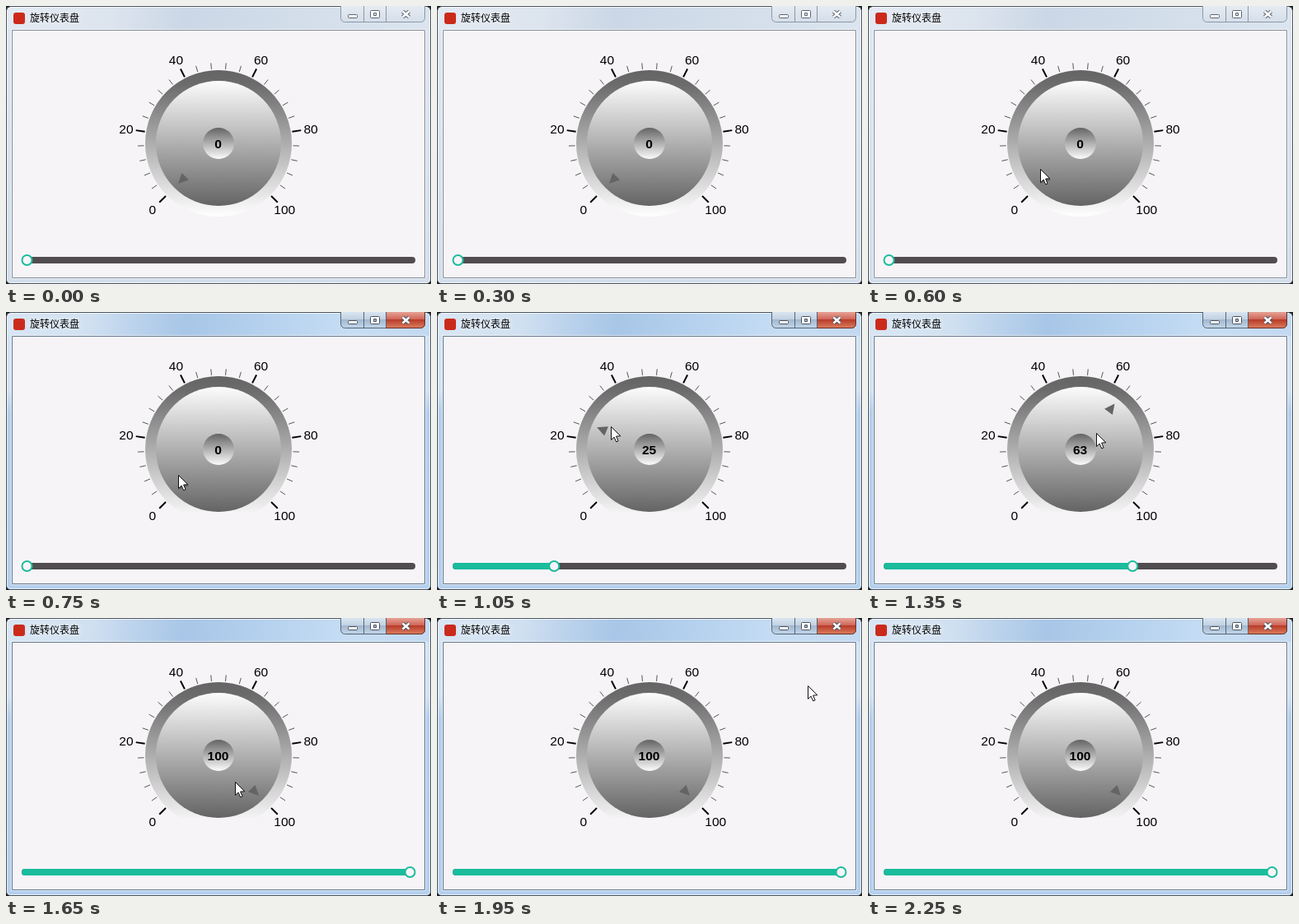
Write an HTML page with a canvas that moves like this. It is 516x338 px and loops after 2.55 s.

```html
<!DOCTYPE html>
<html lang="zh">
<head>
<meta charset="utf-8">
<title>旋转仪表盘</title>
<style>
  html, body { margin: 0; width: 100%; height: 100%; overflow: hidden; background: #222; }
  canvas { display: block; width: 516px; height: 338px; }
</style>
</head>
<body>
<canvas id="stage" width="516" height="338"></canvas>
<script>
const ctx = document.getElementById('stage').getContext('2d');
const LOOP = 2550, STEP = 150, ACTIVATE = 750;
const CX = 258, CY = 167;
const SANS = '"Liberation Sans", Arial, sans-serif';
const PAPER = '#f7f4f8', GREEN = '#1abc9c';

// Keyframes: [ms, value] and [ms, x, y]
const VALUES = [[750, 0], [900, 12], [1050, 25.1], [1350, 63.6], [1500, 84], [1650, 100]];
const POINTER = [[450, 250, 225], [600, 209, 198], [750, 209, 198], [900, 203, 168],
  [1050, 211, 139], [1200, 247, 125], [1350, 277, 147], [1500, 292, 172],
  [1650, 278, 199], [1800, 350, 150], [1950, 450, 82], [2100, 500, 50]];

function sample(keys, t) {
  if (t <= keys[0][0]) return keys[0].slice(1);
  for (let i = 1; i < keys.length; i++) {
    const a = keys[i - 1], b = keys[i];
    if (t <= b[0]) {
      const k = (t - a[0]) / (b[0] - a[0]);
      return a.slice(1).map((v, j) => v + (b[j + 1] - v) * k);
    }
  }
  return keys[keys.length - 1].slice(1);
}

function gradient(x0, y0, x1, y1, stops) {
  const g = ctx.createLinearGradient(x0, y0, x1, y1);
  stops.forEach(([at, color]) => g.addColorStop(at, color));
  return g;
}

function roundRect(x, y, w, h, r, fill, stroke) {
  ctx.beginPath();
  ctx.roundRect(x, y, w, h, r);
  if (fill) { ctx.fillStyle = fill; ctx.fill(); }
  if (stroke) { ctx.strokeStyle = stroke; ctx.lineWidth = 1; ctx.stroke(); }
}

function disc(x, y, r, fill) {
  ctx.beginPath();
  ctx.arc(x, y, r, 0, Math.PI * 2);
  ctx.fillStyle = fill;
  ctx.fill();
}

function polygon(points) {
  ctx.beginPath();
  points.forEach(([x, y]) => ctx.lineTo(x, y));
  ctx.closePath();
}

function text(str, x, y, font, align = 'center', color = '#000') {
  ctx.font = font;
  ctx.textAlign = align;
  ctx.fillStyle = color;
  ctx.fillText(str, x, y);
}

const angleOf = value => (135 + value * 2.7) * Math.PI / 180;
const polar = (a, r) => [CX + r * Math.cos(a), CY + r * Math.sin(a)];

function drawFrame(active) {
  ctx.fillStyle = '#1d1f22';
  ctx.fillRect(0, 0, 516, 338);
  const side = active
    ? gradient(0, 0, 0, 338, [[0, '#d5e3f3'], [0.28, '#d3e2f2'], [0.36, '#b4cfec'], [1, '#b4d0ee']])
    : gradient(0, 0, 0, 338, [[0, '#dfe7f1'], [1, '#d3deeb']]);
  roundRect(0.5, 0.5, 515, 337, [6, 6, 5, 5], side, '#4b535d');
  const bar = active
    ? [[0, '#d9e6f4'], [0.2, '#d0e0f1'], [0.3, '#bcd3ec'], [0.42, '#a8c6e7'], [0.6, '#b5d1ee'], [0.8, '#c6ddf4'], [1, '#c2d9f1']]
    : [[0, '#e3eaf3'], [0.25, '#dce4ee'], [0.42, '#cbd7e6'], [0.65, '#d2ddea'], [1, '#dce5ef']];
  ctx.fillStyle = gradient(0, 0, 516, 60, bar);
  ctx.fillRect(2, 2, 512, 27);
  roundRect(1.5, 1.5, 513, 335, [5, 5, 4, 4], null, 'rgba(255,255,255,.65)');

  roundRect(6.5, 28.5, 503, 303, 1, null, 'rgba(255,255,255,.6)');
  ctx.fillStyle = PAPER;
  ctx.fillRect(7, 29, 502, 302);
  roundRect(7.5, 29.5, 501, 301, 0, null, active ? '#65788d' : '#858e99');

  roundRect(9, 8, 14, 14, 3, '#cb2a1b');
  ctx.save();
  ctx.shadowColor = '#fff';
  ctx.shadowBlur = 9;
  text('旋转仪表盘', 29, 19, '12px "Noto Sans CJK SC", "Noto Sans CJK", sans-serif', 'left');
  ctx.restore();
  drawButtons(active);
}

function drawButtons(active) {
  const glass = active
    ? [[0, '#d9e5f1'], [0.45, '#c3d2e2'], [0.5, '#a3b8ce'], [1, '#c0d5e9']]
    : [[0, '#e5ebf2'], [1, '#d5dfea']];
  const red = [[0, '#e6a296'], [0.45, '#d0685a'], [0.5, '#b93c29'], [1, '#d97a5b']];
  const edge = active ? '#566575' : '#8c98a6';
  roundRect(406.5, -1.5, 102, 21, [0, 0, 5, 5], gradient(0, 0, 0, 19, glass), edge);
  if (active) roundRect(461.5, -1.5, 47, 21, [0, 0, 5, 0], gradient(0, 0, 0, 19, red), '#6b3028');
  ctx.fillStyle = edge;
  ctx.fillRect(434, 0, 1, 19);
  ctx.fillRect(461, 0, 1, 19);

  const ink = active ? '#4b5360' : '#5c6470';
  roundRect(415.5, 10.5, 11, 4, 1, '#fff', ink);
  roundRect(442.5, 5.5, 11, 9, 1, '#fff', ink);
  roundRect(446.5, 8.5, 3, 3, 0, active ? '#a9bdd2' : '#dbe3ec', ink);
  for (const [color, width] of [[ink, 4.6], ['#fff', 2.5]]) {
    ctx.strokeStyle = color;
    ctx.lineWidth = width;
    ctx.beginPath();
    ctx.moveTo(481.5, 6.5); ctx.lineTo(489.5, 13.5);
    ctx.moveTo(489.5, 6.5); ctx.lineTo(481.5, 13.5);
    ctx.stroke();
  }
}

function drawScale() {
  for (let v = 0; v <= 100; v += 4) {
    const a = angleOf(v), major = v % 20 === 0;
    ctx.beginPath();
    ctx.moveTo(...polar(a, 90.5));
    ctx.lineTo(...polar(a, major ? 101.5 : 98));
    ctx.lineWidth = major ? 2 : 1;
    ctx.strokeStyle = major ? '#000' : '#555';
    ctx.stroke();
    if (major) {
      const [x, y] = polar(a, 113.5);
      text(v, x, y + 5.5, '15.5px ' + SANS);
    }
  }
}

function drawDial(value, active) {
  ctx.save();
  ctx.beginPath();
  ctx.rect(160, 70, 200, active ? 173 : 190);
  ctx.clip();
  disc(CX, CY, 89, gradient(0, 78, 0, 256, [[0, '#646464'], [0.1, '#6c6c6c'], [1, '#fff']]));
  ctx.restore();
  disc(CX, CY, 76, gradient(0, 91, 0, 243, [[0, '#fcfcfc'], [1, '#646464']]));

  const a = angleOf(value);
  polygon([polar(a, 69.3), polar(a - 0.107, 57.2), polar(a + 0.107, 57.2)]);
  ctx.fillStyle = '#646464';
  ctx.fill();

  disc(CX, CY, 19, gradient(0, 148, 0, 186, [[0, '#646464'], [1, '#fcfcfc']]));
  text(Math.floor(value), 257.5, 173, 'bold 15.5px ' + SANS);
}

function drawSlider(value) {
  const x = 25.5 + value * 4.65;
  roundRect(19, 305, 478, 8, 4, '#504c50');
  if (value > 0) roundRect(19, 305, x - 19, 8, 4, GREEN);
  disc(x, 309, 7, GREEN);
  disc(x, 309, 5, PAPER);
}

function drawPointer(x, y) {
  ctx.save();
  ctx.translate(Math.round(x) + 0.5, Math.round(y) + 0.5);
  polygon([[0, 0], [0, 16], [3.6, 12.6], [6.2, 18.4], [8.6, 17.4], [6.1, 11.6], [11.3, 11.3]]);
  ctx.fillStyle = '#fff';
  ctx.fill();
  ctx.strokeStyle = '#111';
  ctx.lineWidth = 1;
  ctx.stroke();
  ctx.restore();
}

function draw(now) {
  const t = Math.floor((now % LOOP) / STEP) * STEP;
  const active = t >= ACTIVATE;
  const [value] = sample(VALUES, t);
  drawFrame(active);
  drawScale();
  drawDial(value, active);
  drawSlider(value);
  if (t >= POINTER[0][0] && t <= POINTER[POINTER.length - 1][0]) drawPointer(...sample(POINTER, t));
}

const start = performance.now();
function tick() {
  draw(performance.now() - start);
  requestAnimationFrame(tick);
}
tick();
</script>
</body>
</html>
```
